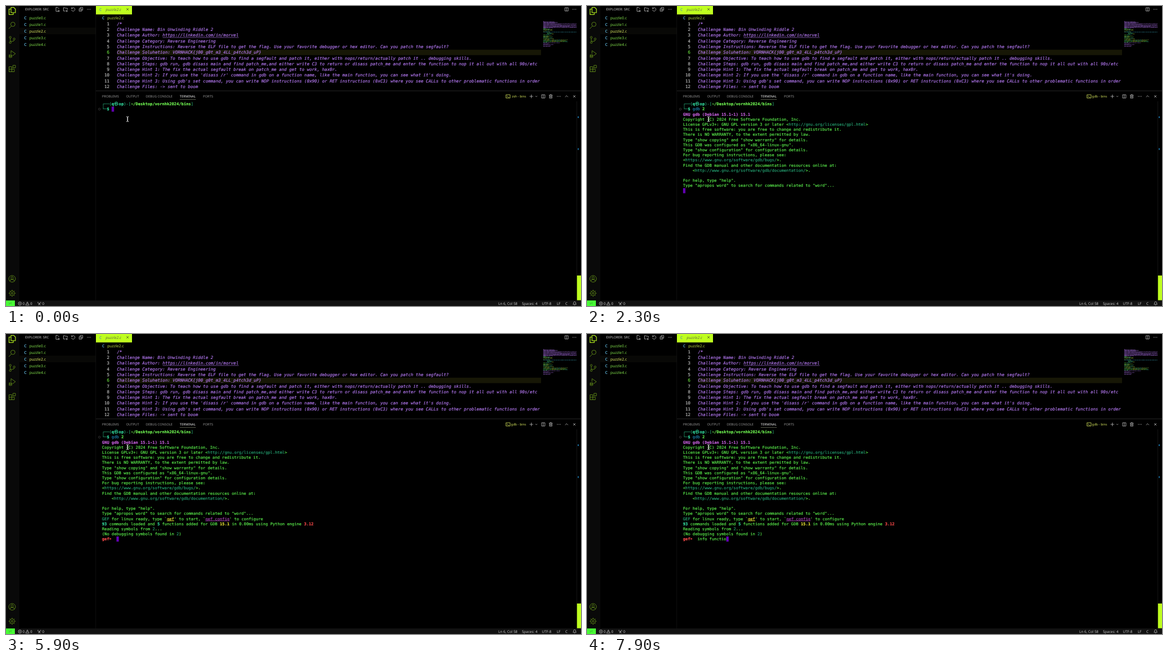
Animation, 1036 px wide and 541 px high, one loop 8 s. Source, as an HTML page:

```html
<!DOCTYPE html>
<html lang="en">
<head>
<meta charset="utf-8">
<style>
html, body { margin: 0; width: 100%; height: 100%; overflow: hidden; background: #000; }
svg { display: block; width: 1036px; height: 541px; }
text { white-space: pre; text-rendering: geometricPrecision; }
.ui { font-family: "Noto Sans", "Open Sans", sans-serif; }
.mono {
  font-family: "DejaVu Sans Mono", "Noto Sans CJK KR", "Noto Sans CJK JP", "Noto Sans CJK", monospace;
  fill: currentColor; stroke: currentColor; stroke-width: .13px;
}
.num { font-size: 7.59px; color: #c4c4c4; }
.num.active { color: #6be33e; }
.code { font-size: 7.59px; font-style: italic; color: #b97cf8; }
.term { font-size: 7.195px; color: #5ffa50; }
.bold { font-weight: bold; }
.line { text-decoration: underline; }
.teal { color: #27ab78; }
.mint { color: #35e8a8; }
.lime { color: #74ff55; }
.cyan { color: #1f8fc0; }
.pink { color: #ca62e2; }
.violet { color: #ae42bd; }
.yellow { color: #f6ef38; }
.red { color: #ff4b4b; }
.hint { color: #999; }
path { fill: none; }
</style>
</head>
<body>
<svg viewBox="0 0 1036 541">
  <g id="frame"></g>
  <g id="terminal"></g>
  <path d="M216.8 199.5q2.2 0 2.2 1.2v6.6q0 1.2-2.2 1.2M221.2 199.5q-2.2 0-2.2 1.2v6.6q0 1.2 2.2 1.2" stroke="#e4e4e4"/>
</svg>
<script>
const LOOP = 8000;
const esc = s => s.replace(/&/g, '&amp;').replace(/</g, '&lt;');
const rect = (x, y, w, h, fill) => `<rect x="${x}" y="${y}" width="${w}" height="${h}" fill="${fill}"/>`;
const label = (x, y, s, fill = '#ccc', size = 5.96, extra = '') =>
  `<text class="ui" x="${x}" y="${y + size * .36}" font-size="${size}" fill="${fill}" ${extra}>${esc(s)}</text>`;
const mono = (x, y, s, cls, extra = '') => `<text class="mono ${cls}" x="${x}" y="${y}" ${extra}>${esc(s)}</text>`;
const icon = (x, y, d, color = '#bbb', width = .8) =>
  `<path transform="translate(${x} ${y})" d="${d}" stroke="${color}" stroke-width="${width}"/>`;
const circle = r => `M${-r} 0a${r} ${r} 0 1 1 ${2 * r} 0a${r} ${r} 0 1 1 ${-2 * r} 0`;

const LIME = '#bfff1f', DIM = '#587f16', GREEN = '#7fdc4a', BLUE = '#519aba', PALE = '#d3e25c';
const dots = 'M-3.2 0h1.2M-.6 0h1.2M2 0h1.2';
const cross = 'M-2-2L2 2M2-2L-2 2';
const split = 'M-3-3h6v6h-6zM0-3v6';

const source = [
  '/*',
  'Challenge Name: Bin Unwinding Riddle 2',
  'Challenge Author: https://linkedin.com/in/morvel',
  'Challenge Category: Reverse Engineering',
  'Challenge Instructions: Reverse the ELF file to get the flag. Use your favorite debugger or hex editor. Can you patch the segfault?',
  'Challenge Soluhetion: VORNHACK{j00_g0t_m3_4LL_p4tch3d_uP}',
  'Challenge Objective: To teach how to use gdb to find a segfault and patch it, either with nops/return/actually patch it .. debugging skills.',
  'Challenge Steps: gdb run, gdb disass main and find patch_me,and either write C3 to return or disass patch_me and enter the function to nop it all out with all 90s/etc',
  'Challenge Hint 1: The fix the actual segfault break on patch_me and get to work, hax0r.',
  "Challenge Hint 2: If you use the 'disass /r' command in gdb on a function name, like the main function, you can see what it's doing.",
  "Challenge Hint 3: Using gdb's set command, you can write NOP instructions (0x90) or RET instructions (0xC3) where you see CALLs to other problematic functions in order",
  'Challenge Files: -> sent to boom'
];

function sidebar() {
  let out = rect(0, 0, 24, 531, '#090909') + rect(24, 39, 138, 12, '#080806') + rect(161.5, 15, .6, 516, '#191919');
  out += icon(11, 9, 'M-2-6.5h5l3 3v6.5h-8zM-2-3.5h-3.5v10h7.5v-3.5', LIME, 1.1);
  out += icon(11, 35, 'M-1.2 1.2L-6 6M-2.5-2a3.9 3.9 0 1 1 7.8 0a3.9 3.9 0 1 1-7.8 0', DIM, 1);
  out += icon(11, 61, 'M-5-4.5a1.7 1.7 0 1 1 3.4 0a1.7 1.7 0 1 1-3.4 0M-5 4.8a1.7 1.7 0 1 1 3.4 0a1.7 1.7 0 1 1-3.4 0M2-1.5a1.7 1.7 0 1 1 3.4 0a1.7 1.7 0 1 1-3.4 0M-3.3-2.8v5.9M3.7.2q0 2.6-3.5 2.6h-3', DIM, 1);
  out += icon(11, 87, 'M-2-1v-5.5l8 5.5-5.5 4M-4.6 1h3.2v3.5a1.6 1.6 0 0 1-3.2 0zM-6 1l1.4 1M0 1l-1.4 1M-6 6l1.4-1M0 6l-1.4-1M-6.3 3.5h6.6', DIM, 1);
  out += icon(11, 113, 'M-5.5-3.5h5v9h-5zM-5.5 1h9.5v4.5h-9.5M1.5-6h4.5v4.5h-4.5z', DIM, 1);
  out += icon(11, 492, circle(6) + 'M-2.2-1.5a2.2 2.2 0 1 1 4.4 0a2.2 2.2 0 1 1-4.4 0M-4 4.4q0-3.4 4-3.4t4 3.4', DIM, 1);
  out += icon(11, 518, circle(4.3) + circle(1.6) + 'M0-6.3v2M0 4.3v2M-6.3 0h2M4.3 0h2M-4.4-4.4l1.4 1.4M3 3l1.4 1.4M-4.4 4.4l1.4-1.4M3-3l1.4-1.4', DIM, 1);
  out += label(34.5, 6, 'EXPLORER: SRC');
  out += icon(93, 6, 'M1 3.5h-4v-7h3l2 2v1M2 1v4M0 3h4');
  out += icon(107, 6, 'M0 3h-3.5v-6h2.5l1 1h3.5v2.5M2.5 1v4M.5 3h4');
  out += icon(121, 6, 'M-2.8-1.5a3.2 3.2 0 1 1-.3 2.4M-3-3.6v2.3h2.3');
  out += icon(135, 6, 'M-3.2-1h4.5v4.3h-4.5zM-1.4-1v-2.3h4.6v4.6h-1.9M-2 1.2h2.2');
  out += icon(149.5, 6, dots, '#bbb', 1.1);
  for (let i = 0; i < 5; i++) {
    const y = 21.4 + 11.92 * i;
    out += label(32.5, y, 'C', BLUE, 7.2, 'font-weight="bold"');
    out += label(42, y, `puzzle${i}.c`, i === 2 ? PALE : GREEN, 6.95);
  }
  return out;
}

function minimap() {
  let out = '', seed = 7;
  const random = () => (seed = seed * 16807 % 2147483647) / 2147483647;
  const dash = (x, y, w, color) => x < 1028 ? rect(x, y, Math.min(w, 1028 - x), .75, color) : '';
  source.forEach((s, i) => {
    for (const word of s.matchAll(/\S+/g))
      out += dash(968 + word.index * .541, 27.2 + i * 1.08, word[0].length * .541, '#7c51a8');
  });
  const colors = ['#38812f', '#278061', '#718c2e', '#70499a'];
  for (let i = 12; i < 43; i++) {
    if (i === 16 || i === 23 || i === 37 || i === 40) continue;
    const wide = i === 18 ? 60 : i > 30 && i < 35 ? 42 : i === 36 ? 30 : 5 + random() * 13;
    for (let x = i > 18 && i < 22 ? 7 : 0; x < wide;) {
      const w = 1 + random() * 4;
      out += dash(968 + x, 27.2 + i * 1.08, w, i === 18 ? '#287786' : colors[i > 35 ? 3 : random() * 3 | 0]);
      x += w + .7;
    }
  }
  return out;
}

function editor() {
  let out = rect(162, 0, 65, 15.2, LIME);
  out += label(168, 6, 'C', '#6fa98a', 7, 'font-weight="bold"');
  out += label(179.5, 6, 'puzzle2.c', '#666c40', 6.95, 'font-style="italic"');
  out += icon(219, 6, cross, '#4a5028') + icon(1010, 6, split) + icon(1024, 6, dots, '#bbb', 1.1);
  out += label(173, 21.4, 'C', BLUE, 7, 'font-weight="bold"') + label(182.5, 21.4, 'puzzle2.c', '#b9d940', 6.95);
  out += rect(200, 78.8, 764, 9.8, '#171706');
  source.forEach((s, i) => {
    const y = 34.9 + i * 10.28;
    out += mono(186.3, y, `${i + 1}`, i === 5 ? 'num active' : 'num', 'text-anchor="end"');
    out += mono(200, y, s, 'code');
  });
  return out + rect(282.2, 56.6, 137, .6, '#b97cf8') + minimap();
}

function panel() {
  let out = rect(162, 152.6, 874, .8, '#303030') + rect(1028.3, 172, .6, 314, '#202020');
  [['PROBLEMS', 173], ['OUTPUT', 216.5], ['DEBUG CONSOLE', 252], ['TERMINAL', 313], ['PORTS', 355]].forEach(([s, x], i) =>
    out += label(x, 162.8, s, i === 3 ? '#f0f0f0' : '#969696', 5.85));
  out += rect(313, 168, 29, .6, '#8a8f78');
  out += icon(904.5, 163, 'M-3.7-3h7.4v6h-7.4zM-2.2-1.3l1.4 1.3-1.4 1.3M0 1.6h2', PALE);
  out += icon(946.5, 163, 'M-3.2 0h6.4M0-3.2v6.4') + icon(955.5, 163, 'M-1.6-.8l1.6 1.6 1.6-1.6');
  out += icon(968, 163, split);
  out += icon(981.5, 163, 'M-3.2-2.2h6.4M-1-2.2v-1h2v1M-2.3-2.2v5.4h4.6v-5.4M-.8-1v3M.8-1v3');
  out += icon(996, 163, dots, '#bbb', 1.1) + icon(1010, 163, 'M-2.6 1.2l2.6-2.6 2.6 2.6') + icon(1024, 163, cross);
  out += icon(168.3, 186, circle(1.8), '#555', .6);
  out += rect(1030, 199, 2, 3, '#176a9b') + rect(1030, 256.5, 2, 3, '#176a9b');
  return out + rect(1028.7, 486, 7.3, 44.6, LIME);
}

function statusBar() {
  let out = rect(0, 531, 1036, 10, '#121212') + rect(0, 531, 16, 10, '#48fb36');
  out += icon(7.5, 536.3, 'M-2.4-1.2l1.8 1.6-1.8 1.6M2.4-2l-1.8 1.6 1.8 1.6', '#2c8c24', .7);
  out += icon(25, 536.5, circle(2.9) + 'M-1.2-1.2l2.4 2.4M1.2-1.2l-2.4 2.4', '#ccc', .7);
  out += icon(38.5, 536.5, 'M0-2.9l3.1 5.6h-6.2zM0-1v1.8', '#ccc', .7);
  out += icon(60, 536.5, 'M-1.4 3l1.4-4.5 1.4 4.5M-1 1.3h2M-2.2-2.9q-1.2 1.4 0 2.8M2.2-2.9q1.2 1.4 0 2.8', '#ccc', .7);
  [['0', 30], ['0', 43.8], ['0', 65.3], ['Ln 6, Col 58', 887], ['Spaces: 4', 929.5], ['UTF-8', 965.5], ['LF', 992.3], ['C', 1007.7]]
    .forEach(([s, x]) => out += label(x, 536.5, s, '#ccc', 6.4));
  return out + icon(1024.5, 536.3, 'M-3 1.7l1-1.2v-1.5a2 2 0 0 1 4 0v1.5l1 1.2zM-.8 2.8h1.6', '#ccc', .7);
}

// Terminal cells
const CELL = 4.332, ROW = 9.19, LEFT = 173, TOP = 172.2;
const cellX = col => LEFT + col * CELL;
const put = (row, col, parts) => parts.map(([s, cls = '']) => {
  const out = mono(cellX(col), TOP + row * ROW + 7.1, s, `term ${cls}`);
  col += s.length;
  return out;
}).join('');
const cursor = (row, col) => rect(cellX(col), TOP + row * ROW, CELL, ROW, '#6200b3');
const rows = (first, list) => list.map((parts, i) => put(first + i, 0, parts)).join('');

const prompt = put(0, 0, [['┌──(', 'teal'], ['q', 'mint bold']]) + put(0, 5.1, [['㉿', 'mint bold']]) +
  put(0, 7, [['op', 'mint bold'], [')-[', 'teal'], ['~/Desktop/vornhk2024/bins', 'lime bold'], [']', 'teal']]) +
  put(1, 0, [['└─', 'teal'], ['$', 'mint bold']]);

const banner = rows(2, [
  [['GNU gdb (Debian 15.1-1) 15.1', 'pink bold']],
  [['Copyright (C) 2024 Free Software Foundation, Inc.']],
  [['License GPLv3+: GNU GPL version 3 or later <'], ['http://gnu.org/licenses/gpl.html', 'teal'], ['>']],
  [['This is free software: you are free to change and redistribute it.']],
  [['There is NO WARRANTY, to the extent permitted by law.']],
  [['Type "show copying" and "show warranty" for details.']],
  [['This GDB was configured as "x86_64-linux-gnu".']],
  [['Type "show configuration" for configuration details.']],
  [['For bug reporting instructions, please see:']],
  [['<'], ['https://www.gnu.org/software/gdb/bugs/', 'teal'], ['>.']],
  [['Find the GDB manual and other documentation resources online at:']],
  [['    <'], ['http://www.gnu.org/software/gdb/documentation/', 'teal'], ['>.']],
  [],
  [['For help, type "help".']],
  [['Type "apropos word" to search for commands related to "word"...']]
]);

const ready = rows(17, [
  [['GEF', 'teal'], [' for linux ready, type `'], ['gef', 'yellow line'], ["' to start, `"], ['gef config', 'violet line'], ["' to configure"]],
  [['93', 'mint bold'], [' commands loaded and '], ['5', 'mint bold'], [' functions added for GDB '], ['15.1', 'yellow bold'],
    [' in 0.00ms using Python engine '], ['3.12', 'red bold']],
  [['Reading symbols from '], ['2', 'teal'], ['...']],
  [['(No debugging symbols found in '], ['2', 'teal'], [')']],
  [['gef➤', 'red bold']]
]);

const keys = [
  [0, ''], [600, 'g'], [800, 'gd'], [900, 'gdb'], [1100, 'gdb '], [1300, 'gdb 2'],
  [2800, ''], [4300, 'r'], [5900, ''], [6000, 'i'], [6100, 'in'], [6200, 'inf'], [6300, 'info'], [6500, 'info '],
  [6700, 'info d'], [7200, 'info '], [7300, 'info f'], [7400, 'info fun'], [7500, 'info func'],
  [7800, 'info funct'], [7900, 'info functio']
];

function shellInput(typed) {
  const full = 'gdb 2';
  const known = typed.length > 2;
  return put(1, 4, [[typed.slice(0, 3), known ? 'cyan' : 'line'], [typed.slice(3), 'bold'],
    [typed ? full.slice(typed.length) : '', 'hint']]);
}

function terminal(t) {
  const typed = keys.findLast(([start]) => t >= start)[1];
  const running = t >= 2200;
  let out = label(937, 162.8, `${running ? 'gdb' : 'zsh'} - bins`, PALE, 5.85, 'text-anchor="end"') + prompt;
  if (!running) return out + cursor(1, 4 + typed.length) + shellInput(typed);
  out += shellInput('gdb 2');
  if (t < 2300) return out + cursor(2, 0);
  out += banner;
  if (t < 2800) return out + cursor(17, 0);
  return out + ready + cursor(21, 6 + typed.length) + put(21, 6, [[typed]]);
}

document.getElementById('frame').innerHTML = sidebar() + editor() + panel() + statusBar();
const screen = document.getElementById('terminal');
const begin = performance.now();
let shown = '';
function draw() {
  const next = terminal((performance.now() - begin) % LOOP);
  if (next !== shown) screen.innerHTML = shown = next;
  requestAnimationFrame(draw);
}
draw();
</script>
</body>
</html>
```
